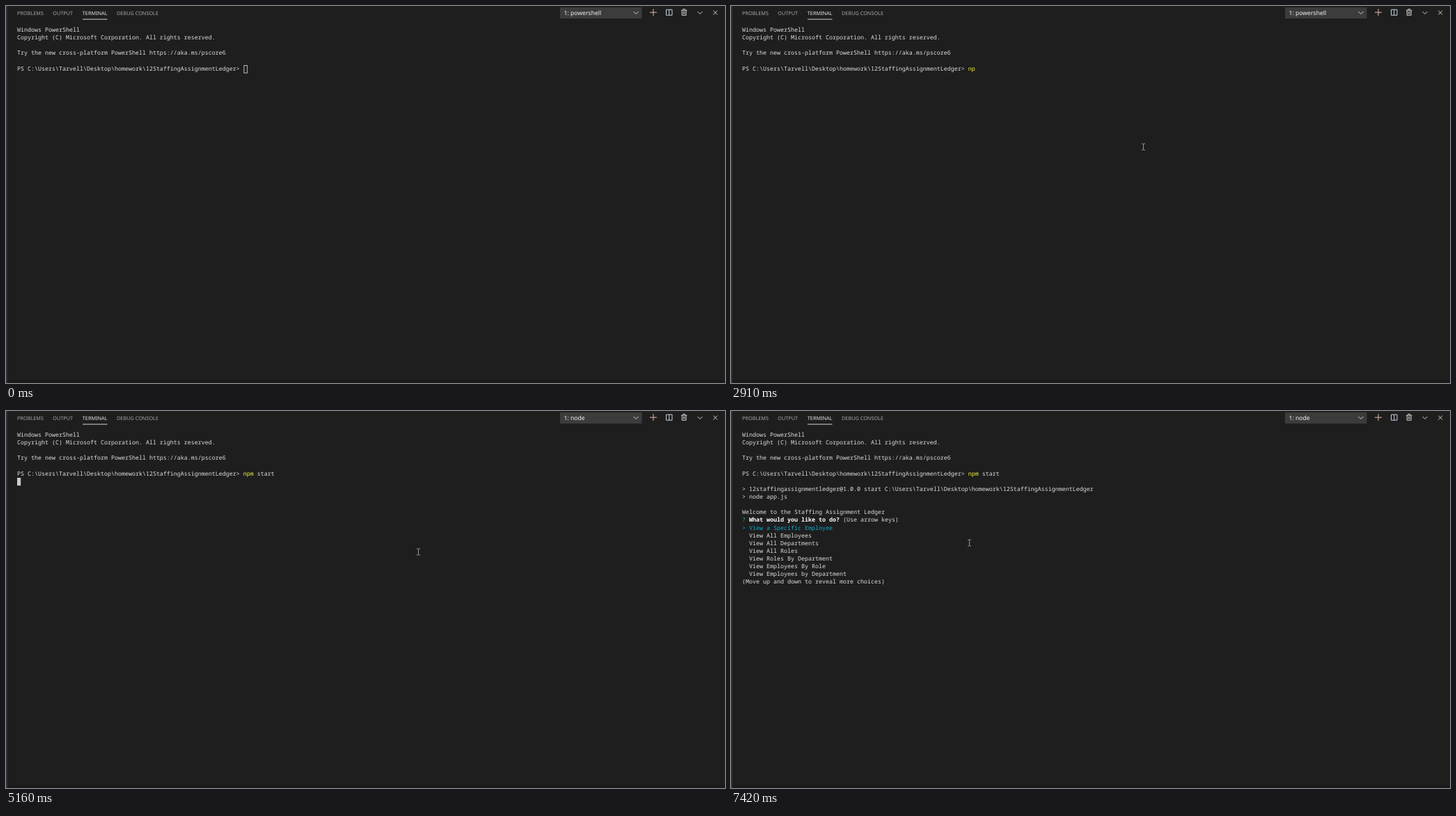
Write an HTML page that moves like this. It is 1033 px wide and 542 px high and loops after 8 s.

```html
<!DOCTYPE html>
<html lang="en">
<head>
<meta charset="utf-8">
<title>Terminal session</title>
<style>
  html, body { margin: 0; width: 100%; height: 100%; overflow: hidden; background: #1e1e1e; }
  svg { display: block; width: 100%; height: 100%; }
  text { white-space: pre; text-rendering: geometricPrecision; }
  .ui { font-family: "Noto Sans", "Open Sans", sans-serif; }
  .tab { font-size: 7.3px; fill: #a6a6a6; }
  .on { fill: #e7e7e7; }
  .pick { font-size: 8.6px; fill: #f5f5f5; }
  .icon { fill: none; stroke: #d0d0d0; stroke-width: 1; }
  #term { font-family: "Noto Sans Mono", "DejaVu Sans Mono", monospace; font-size: 8.345px; font-weight: 500; fill: #dedede; }
  .yellow { fill: #f5f543; }
  .green { fill: #0dbc79; }
  .cyan { fill: #11a8cd; }
  .bold { font-weight: 700; fill: #fff; }
</style>
</head>
<body>
<svg viewBox="0 0 1033 542" preserveAspectRatio="none">
  <rect width="1033" height="542" fill="#1e1e1e"/>
  <rect y="538" width="1033" height="4" fill="#1a1a1a"/>
  <rect width="2" height="542" fill="#333"/>

  <g class="ui">
    <text class="tab" x="16" y="12.7">PROBLEMS</text>
    <text class="tab" x="67.2" y="12.7">OUTPUT</text>
    <text class="tab on" x="109.8" y="12.7">TERMINAL</text>
    <text class="tab" x="159" y="12.7">DEBUG CONSOLE</text>
    <rect class="on" x="110" y="18.6" width="35.5" height="0.9"/>
    <rect x="796" y="2" width="117.5" height="16" fill="#3c3c3c"/>
    <text class="pick" id="shell" x="801.6" y="13.2"></text>
  </g>

  <g class="icon">
    <path d="M901.5 8l3.5 3.5 3.5-3.5M993.5 8l3.5 3.5 3.5-3.5"/>
    <path d="M925 9.2h10M930 4.2v10" stroke="#e0b8ac"/>
    <path d="M948.5 5.2h8.5v8h-8.5zM952.75 5.2v8" stroke="#c5d3e0"/>
    <path d="M970 6.3h8.5M972.7 5.8v-1.3h3v1.3M971.2 6.3v7h6v-7M973.2 7.8v4M975.2 7.8v4"/>
    <path d="M1016.2 6.7l5.8 5.8M1022 6.7l-5.8 5.8"/>
  </g>

  <g id="term"></g>
  <rect id="caret"/>
  <path id="mouse" d="M-2.5 -4.5h2l.5 .5 .5 -.5h2M0 -4v8M-2.5 4.5h2l.5 -.5 .5 .5h2" fill="none" stroke="#b4b4b4" stroke-width="0.8"/>
</svg>

<script>
const LOOP = 8000, LEFT = 16, COL = 5.007, ROW = 11.13;
const $ = id => document.getElementById(id);
const svgEl = name => document.createElementNS("http://www.w3.org/2000/svg", name);

const dir = "C:\\Users\\Tarvell\\Desktop\\homework\\12StaffingAssignmentLedger";
const prompt = `PS ${dir}> `;
const command = "npm start";

// Adds one terminal row made of [text, class] spans.
function addLine(row, ...spans) {
  const line = svgEl("text");
  line.setAttribute("x", LEFT);
  line.setAttribute("y", 37 + row * ROW);
  const parts = spans.map(([str, cls = ""]) => {
    const span = svgEl("tspan");
    span.textContent = str;
    span.setAttribute("class", cls);
    line.append(span);
    return span;
  });
  $("term").append(line);
  return { line, parts };
}

addLine(0, ["Windows PowerShell"]);
addLine(1, ["Copyright (C) Microsoft Corporation. All rights reserved."]);
addLine(3, ["Try the new cross-platform PowerShell https://aka.ms/pscore6"]);
const [, tool, args] = addLine(5, [prompt], ["", "yellow"], [""]).parts;

// Rows that appear later: [time, row, ...spans]
const choices = [
  "View All Employees", "View All Departments", "View All Roles",
  "View Roles By Department", "View Employees By Role", "View Employees by Department"
];
const output = [
  [6010, 7, [`> 12staffingassignmentledger@1.0.0 start ${dir}`]],
  [6010, 8, ["> node app.js"]],
  [7100, 10, ["Welcome to the Staffing Assignment Ledger"]],
  [7200, 11, ["? ", "green"], ["What would you like to do?", "bold"], [" (Use arrow keys)"]],
  [7200, 12, ["> View a Specific Employee", "cyan"]],
  ...choices.map((name, i) => [7200, 13 + i, ["  " + name]]),
  [7200, 19, ["(Move up and down to reveal more choices)"]]
].map(([time, row, ...spans]) => ({ time, line: addLine(row, ...spans).line }));

const keyTimes = [2210, 2590, 2990, 3220, 3460, 3770, 4070, 4470, 4760];
const caretGaps = [[2910, 2990], [4700, 4760], [7200, LOOP]];
const caretRows = [[0, 5], [4950, 6], [6010, 10], [7100, 11]];
const titles = [[0, "powershell"], [5010, "cmd"], [5160, "node"]];

// Pointer positions, each held until the next: [time, x, y]
const pointer = [
  [70, 926, 499], [144, 842, 432], [218, 764, 371], [292, 702, 322], [366, 664, 292], [440, 651, 282],
  [890, 646, 274], [966, 628, 250], [1042, 606, 222], [1118, 592, 204], [1194, 586.5, 198], [1270, 592.5, 202.5],
  [7200, 545, 200], [7270, 450, 195], [7345, 368, 191], [7420, 342.5, 189.5]
];

const latest = (list, t) => list.filter(item => item[0] <= t).pop();

function setAttrs(el, attrs) {
  for (const key in attrs) el.setAttribute(key, attrs[key]);
}

function drawCaret(t, typed) {
  const row = latest(caretRows, t)[1];
  const col = row === 5 ? prompt.length + typed : 0;
  const focused = t >= 1440;
  const inset = focused ? 0 : 0.5;
  const hidden = caretGaps.some(([from, to]) => t >= from && t < to);
  setAttrs($("caret"), {
    x: LEFT + col * COL + inset,
    y: Math.round(29.4 + row * ROW) + inset,
    width: 5.2 - inset,
    height: 11.2 - inset,
    fill: focused ? "#cccccc" : "none",
    stroke: focused ? "none" : "#cccccc",
    "stroke-width": 0.9,
    visibility: hidden ? "hidden" : "visible"
  });
}

function draw(t) {
  const typed = keyTimes.filter(time => time <= t).length;
  tool.textContent = command.slice(0, Math.min(typed, 3));
  args.textContent = command.slice(3, Math.max(typed, 3));
  $("shell").textContent = "1: " + latest(titles, t)[1];
  for (const { time, line } of output) {
    line.setAttribute("visibility", t >= time ? "visible" : "hidden");
  }
  drawCaret(t, typed);

  const spot = latest(pointer, t);
  setAttrs($("mouse"), {
    visibility: spot ? "visible" : "hidden",
    transform: spot ? `translate(${spot[1]} ${spot[2]})` : ""
  });
}

function tick() {
  draw(performance.now() % LOOP);
  requestAnimationFrame(tick);
}
tick();
</script>
</body>
</html>
```
